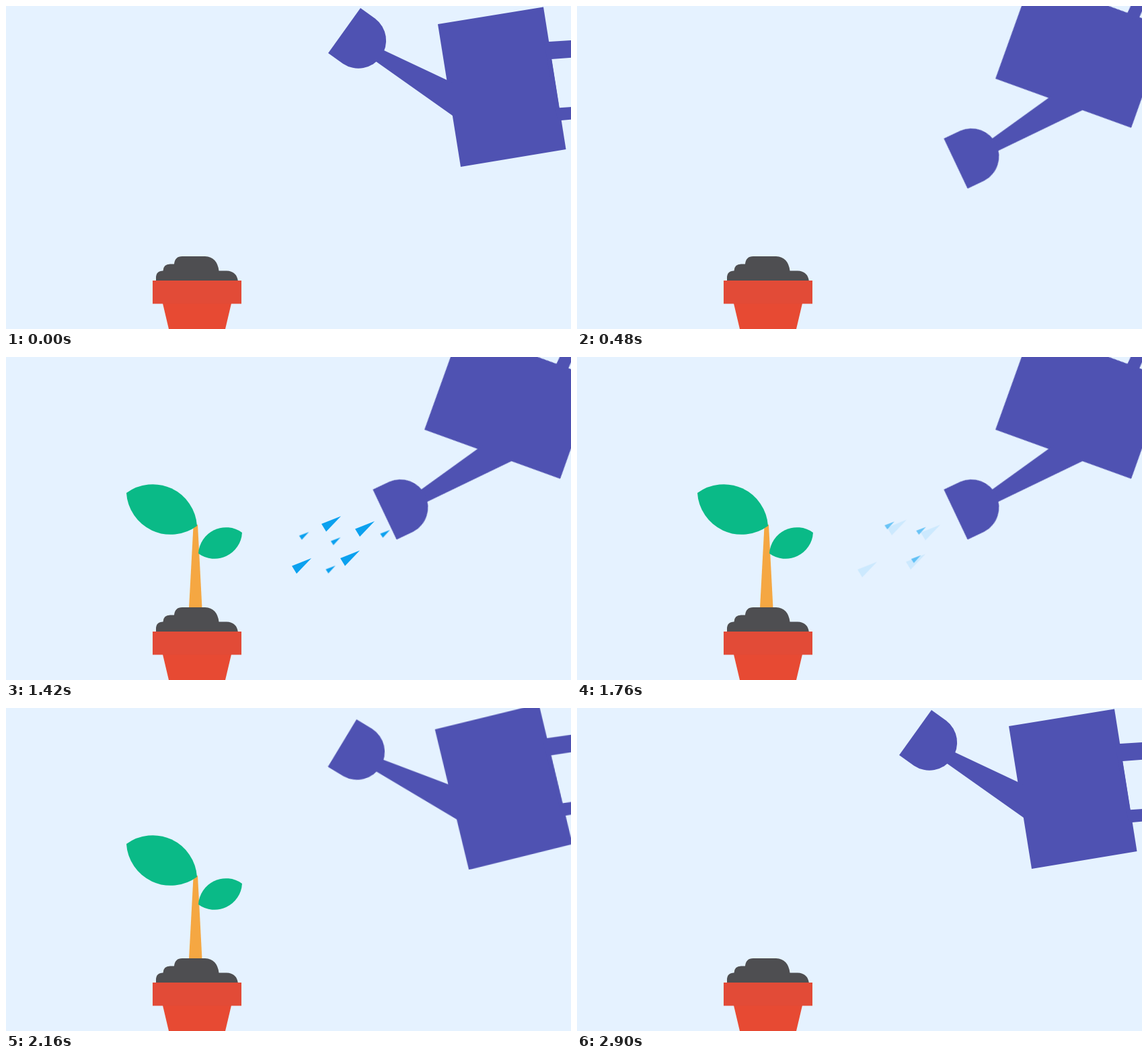
Write an HTML page that moves like this. It is 840 px wide and 480 px high and loops after 3.08 s.

```html
<!DOCTYPE html>
<html lang="en">
<head>
<meta charset="utf-8">
<title>Watering a seedling</title>
<style>
  html, body { margin: 0; width: 100%; height: 100%; overflow: hidden; background: #e5f2ff; }
  svg { display: block; width: 840px; height: 480px; }

  :root { --loop: 3080ms; --spray: calc(var(--loop) / 13); }

  .can, .stem, .leaf, .shower { animation: var(--loop) ease infinite; }

  .can { fill: #4f52b2; transform-origin: 700.8px 84.4px; animation-name: tilt; }
  .stem { fill: #f5a742; transform-origin: 282px 372px; animation-name: sprout; }
  .leaf { fill: #0aba87; }
  .leaf.large { transform-origin: 284px 251px; animation-name: unfold-large; }
  .leaf.small { transform-origin: 286px 292px; animation-name: unfold-small; }

  .shower { fill: #0ba1ef; animation-timing-function: linear; }
  .shower.fine { animation-name: shower-fine; }
  .shower.heavy { animation-name: shower-heavy; }
  .spray { animation: var(--spray) linear infinite; }
  .fine .spray { animation-name: spray-fine; animation-delay: -161ms; }
  .heavy .spray { animation-name: spray-heavy; animation-delay: -125ms; }

  @keyframes tilt {
    0%, 5.52% { transform: rotate(0deg); }
    15.26%, 63.64% { transform: rotate(-61deg); }
    73.38%, 100% { transform: rotate(0deg); }
  }
  @keyframes sprout {
    0%, 23.7% { transform: scale(0); }
    29.22%, 88.31% { transform: scale(1); }
    94.16%, 100% { transform: scale(0); }
  }
  @keyframes unfold-large {
    0%, 33.44% { transform: scale(0); }
    38.96%, 76.43% { transform: scale(1); }
    81.82%, 100% { transform: scale(0); }
  }
  @keyframes unfold-small {
    0%, 31.82% { transform: scale(0); }
    37.01%, 77.6% { transform: scale(1); }
    83.12%, 100% { transform: scale(0); }
  }
  @keyframes shower-fine {
    0%, 17.85% { opacity: 0; }
    17.86%, 58.44% { opacity: 1; }
    63.31%, 100% { opacity: 0; }
  }
  @keyframes shower-heavy {
    0%, 34.41% { opacity: 0; }
    34.42%, 58.44% { opacity: 1; }
    63.31%, 100% { opacity: 0; }
  }
  @keyframes spray-fine {
    0% { transform: translate(25px, -18px); opacity: 0; }
    20% { opacity: 1; }
    80% { opacity: 1; }
    100% { transform: translate(-13px, 9.4px); opacity: 0; }
  }
  @keyframes spray-heavy {
    0% { transform: none; opacity: 0; }
    35%, 65% { transform: none; opacity: 1; }
    100% { transform: translate(-9px, 6px); opacity: 0; }
  }
</style>
</head>
<body>
<svg viewBox="0 0 840 480" aria-label="A watering can makes a seedling grow">
  <defs>
    <path id="drop" d="M0 0L-29 11.5L-22 23Z"/>
    <path id="droplet" d="M0 0L-14.5 5.5L-10.5 11.5Z"/>
  </defs>

  <path class="stem" d="M272 373L278.5 252Q279 250 285 249L291.5 373Z"/>
  <path class="leaf large" d="M179 202A66 66 0 0 1 284 251A66 66 0 0 1 179 202Z"/>
  <path class="leaf small" d="M286 292A41 41 0 0 1 351 261A41 41 0 0 1 286 292Z"/>

  <path fill="#4e4e51" d="M223 409V404Q223 393.5 233.5 393.5Q234 383.5 244 383.5H250Q251 372 262 372H296Q314 373 316.5 393.5H328Q343 394 345 409Z"/>
  <path fill="#e74a33" d="M233 442H335L326 480H242Z"/>
  <path fill="#e24b37" d="M218 408H350V442.5H218Z"/>

  <g class="shower fine">
    <g class="spray">
      <use href="#droplet" x="451" y="259.5"/>
      <use href="#droplet" x="498" y="267.5"/>
      <use href="#droplet" x="571.5" y="256.5"/>
      <use href="#droplet" x="490.5" y="309.5"/>
    </g>
  </g>
  <g class="shower heavy">
    <g class="spray">
      <use href="#drop" x="498" y="236.5"/>
      <use href="#drop" x="548" y="244"/>
      <use href="#drop" x="454" y="299"/>
      <use href="#drop" x="526" y="287.5"/>
    </g>
  </g>

  <g class="can">
    <path d="M642 27L799 1.5L832.5 213L676 239Z"/>
    <path d="M560 65L664 114V163L548 81Z"/>
    <path d="M527 3L548.9 18.7A41.2 41.2 0 0 1 501 85.7L479 70Z"/>
    <path fill-rule="evenodd" d="M800 53.5L880 48.5V165L820 170.5ZM811 79L851 76L855.5 149L822.5 151.3Z"/>
  </g>
</svg>
</body>
</html>
```
